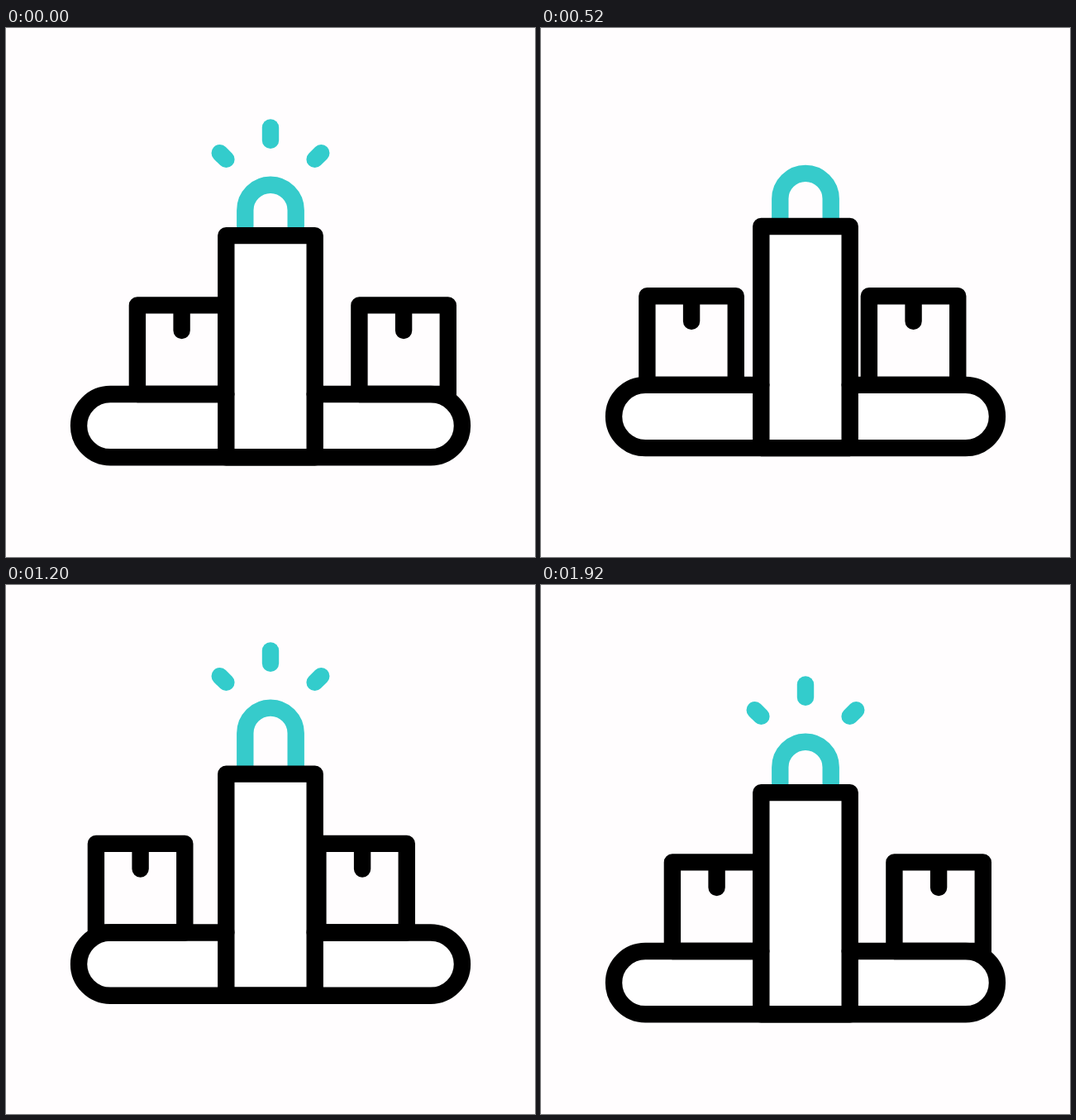
An HTML page that plays this animation: 640 px wide and 640 px high, repeating every 2.04 s.

```html
<!DOCTYPE html>
<html lang="en">
<head>
<meta charset="utf-8">
<title>Conveyor scanner</title>
<style>
  html, body { margin: 0; width: 100%; height: 100%; overflow: hidden; background: #fffdfe; }
  svg { display: block; width: 100vw; height: 100vh; }
  svg * { stroke-linejoin: round; }
  .ink { fill: none; stroke: #000; stroke-width: 20.4; stroke-linecap: round; }
  .lamp { fill: none; stroke: #36cbcb; stroke-width: 20.4; }
  .ray { stroke: #33cccc; stroke-width: 20.4; stroke-linecap: round; }
  .white { fill: #fff; }
</style>
</head>
<body>
<svg viewBox="0 0 640 640">
  <g id="machine">
    <g id="beacon">
      <path class="lamp" d="M289.3 275V220.4a30.7 30.7 0 0 1 61.4 0V275"/>
      <g id="rays"></g>
    </g>
    <rect class="white" x="88" y="443" width="464" height="76.3" rx="38.2"/>
    <g id="boxes" class="ink">
      <path id="box" d="M158.9 335.4H266.3V443H158.9ZM212.6 335.4V366"/>
      <use href="#box" x="268.5"/>
    </g>
    <rect class="ink" style="fill:#fff" x="266.3" y="251.1" width="107.4" height="268.2"/>
    <path class="ink" d="M266.3 443H126.2a38.15 38.15 0 0 0 0 76.3H513.8a38.15 38.15 0 0 0 0-76.3H373.7"/>
  </g>
</svg>
<script>
const STEP = 40, LOOP = 2040;
const get = id => document.getElementById(id);
const machine = get('machine'), beacon = get('beacon'), boxes = get('boxes'), rays = get('rays');

// Outer end, then inner end
const rayEnds = [
  [320, 120.5, 320, 135.9],
  [258.7, 151.2, 266.4, 158.9],
  [381.3, 151.2, 373.6, 158.9]
];
const rayLines = rayEnds.map(() => {
  const line = document.createElementNS('http://www.w3.org/2000/svg', 'line');
  line.setAttribute('class', 'ray');
  return rays.appendChild(line);
});

// Cubic bezier (.5, 0, .5, 1), solved by bisection
function ease(x) {
  if (x <= 0) return 0;
  if (x >= 1) return 1;
  let lo = 0, hi = 1;
  for (let i = 0; i < 24; i++) {
    const s = (lo + hi) / 2;
    if (1.5 * s - 1.5 * s * s + s * s * s < x) lo = s; else hi = s;
  }
  return lo * lo * (3 - 2 * lo);
}
const ramp = (n, from, to) => ease((n - from) / (to - from));
const trip = (n, a, b, c, d) => ramp(n, a, b) - ramp(n, c, d);
const move = (el, x, y) => el.setAttribute('transform', `translate(${x} ${y})`);

function drawRays(n) {
  // Shrink towards the outer end, then grow back from the inner end
  const start = n < 13 ? 0 : 1 - ramp(n, 14, 26.6);
  const end = n < 13 ? 1 - ramp(n, 2, 13) : 1;
  rays.style.display = end - start < 0.001 ? 'none' : '';
  rayEnds.forEach(([x1, y1, x2, y2], i) => {
    const set = (name, a, b, k) => rayLines[i].setAttribute(name, a + (b - a) * k);
    set('x1', x1, x2, start);
    set('y1', y1, y2, start);
    set('x2', x1, x2, end);
    set('y2', y1, y2, end);
  });
}

function draw(now) {
  const n = Math.floor((now % LOOP) / STEP + 0.001);
  move(machine, 0, -24.4 * trip(n, 2, 25, 25, 48));
  move(beacon, 0, -19.2 * trip(n, 8.5, 24.5, 27.5, 44));
  move(boxes, -53.9 * trip(n, 5, 20, 26, 45), 0);
  drawRays(n);
}

let origin;
function tick(now) {
  origin ??= now;
  draw(now - origin);
  requestAnimationFrame(tick);
}
draw(0);
requestAnimationFrame(tick);
</script>
</body>
</html>
```
